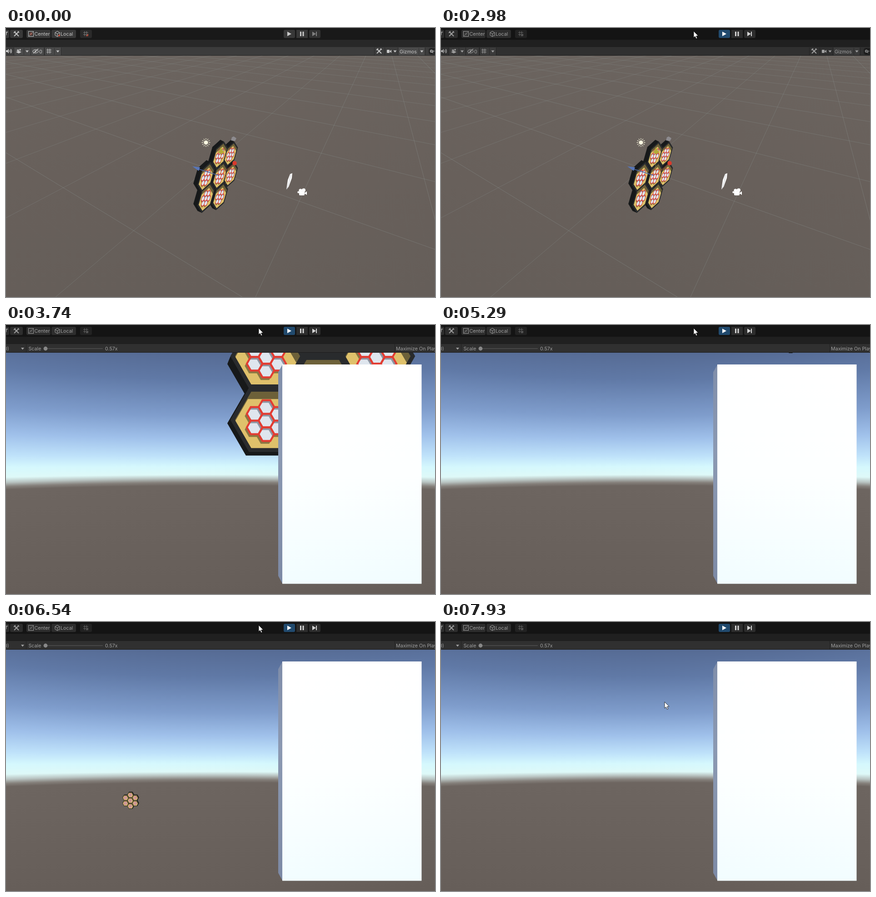
An HTML page with a canvas for the animation above (8000 ms loop, 944 px wide and 593 px high).

```html
<!DOCTYPE html>
<html lang="en">
<head>
<meta charset="utf-8">
<title>Hive editor</title>
<style>
html, body { margin: 0; width: 100%; height: 100%; overflow: hidden; background: #191919; }
canvas { display: block; }
</style>
</head>
<body>
<canvas id="stage" width="944" height="593"></canvas>
<script>
const W = 944, H = 593, LOOP = 8000, TOP = 61;
const PLAY = 1180, GAME = 3040;
const ctx = document.getElementById('stage').getContext('2d');
const S3 = Math.sqrt(3);
const FLOWER = [[0, -1], [1, -1], [-1, 0], [0, 0], [1, 0], [-1, 1], [0, 1]];

function layer(paint) {
  const c = document.createElement('canvas');
  c.width = W;
  c.height = H;
  paint(c.getContext('2d'));
  return c;
}

function poly(g, pts, fill) {
  g.beginPath();
  for (let i = 0; i < pts.length; i += 2) g.lineTo(pts[i], pts[i + 1]);
  g.closePath();
  g.fillStyle = fill;
  g.fill();
}

function disc(g, x, y, r, fill) {
  g.beginPath();
  g.arc(x, y, r, 0, 7);
  g.fillStyle = fill;
  g.fill();
}

function rect(g, x, y, w, h, fill, r = 0) {
  g.beginPath();
  g.roundRect(x, y, w, h, r);
  g.fillStyle = fill;
  g.fill();
}

function line(g, pts, color, width = 1) {
  g.beginPath();
  for (let i = 0; i < pts.length; i += 2) g.lineTo(pts[i], pts[i + 1]);
  g.strokeStyle = color;
  g.lineWidth = width;
  g.stroke();
}

// Position at time t on a list of [time, ...values]
function track(t, keys) {
  let i = 1;
  while (i < keys.length - 1 && keys[i][0] < t) i++;
  const a = keys[i - 1], b = keys[i];
  const k = Math.min(1, Math.max(0, (t - a[0]) / (b[0] - a[0])));
  return a.slice(1).map((v, n) => v + (b[n + 1] - v) * k);
}

// ---- hive ----

function hexPath(g, x, y, r) {
  g.beginPath();
  for (let k = 0; k < 6; k++) {
    g.lineTo(x + r * Math.cos(k * Math.PI / 3), y + r * Math.sin(k * Math.PI / 3));
  }
  g.closePath();
}

function hex(g, x, y, r, fill) {
  hexPath(g, x, y, r);
  g.fillStyle = fill;
  g.fill();
}

// Hexagon whose upper right inside lies in shadow
function pit(g, x, y, r, dx, dy, dark, light) {
  g.save();
  hex(g, x, y, r, dark);
  g.clip();
  hex(g, x + dx, y + dy, r, light);
  g.restore();
}

function miniCells(paint) {
  const r = 0.213;
  for (const [q, s] of FLOWER) paint(-0.03 + 1.5 * r * q, 0.02 + S3 * r * (s + q / 2), r);
}

// One cell in unit size, in the current transform
function cell(g, inner) {
  hex(g, 0, 0, 1.01, '#292b2d');
  pit(g, 0, 0, inner, -0.09, 0.2, '#6d6139', '#dfc16b');
  miniCells((x, y, r) => hex(g, x - 0.04, y + 0.06, r * 1.08, '#8a7743'));
  miniCells((x, y, r) => pit(g, x, y, r, -0.045, 0.07, '#8d95a2', '#dfe6ee'));
  g.strokeStyle = '#e23d33';
  g.lineWidth = 0.052;
  miniCells((x, y, r) => { hexPath(g, x, y, r); g.stroke(); });
}

// cells: {m: affine matrix, off: shift of the back face}
function drawHive(g, cells, inner) {
  for (const { m, off } of cells) {
    for (let k = 6; k > 0; k--) {
      g.save();
      g.translate(off[0] * k / 6, off[1] * k / 6);
      g.transform(...m);
      hex(g, 0, 0, 1.01, '#17191a');
      g.restore();
    }
  }
  for (const { m } of cells) {
    g.save();
    g.transform(...m);
    cell(g, inner);
    g.restore();
  }
}

function gameHive(g, cx, cy, r) {
  const depth = 0.065 * r / 81;
  drawHive(g, FLOWER.map(([q, s]) => {
    const x = cx + 1.5 * r * q, y = cy + S3 * r * (s + q / 2);
    return { m: [r, 0, 0, r, x, y], off: [(472 - x) * depth, (327 - y) * depth] };
  }), 0.885);
}

function sceneHive(g) {
  drawHive(g, FLOWER.map(([q, s]) => {
    const k = q < 0 ? 1.1 : q > 0 ? 0.9 : 1;
    const x = 471 + 27 * q - 3.5 * q * q;
    const y = 326 - 25.5 * q + 45 * (s + q / 2);
    return { m: [17.5 * k, -16 * k, 0, 26 * k, x, y], off: [-8 * k, -4] };
  }), 0.86);
}

// ---- scene view ----

function paintScene(g) {
  const bg = g.createLinearGradient(0, TOP, 0, H);
  bg.addColorStop(0, '#6b645f');
  bg.addColorStop(0.5, '#68605b');
  bg.addColorStop(1, '#655e59');
  rect(g, 0, TOP, W, H - TOP, bg);

  // Two families of parallels, each meeting in a point on the horizon
  const family = (vx, first, step, count, alpha) => {
    for (let n = 0; n < count; n++) {
      line(g, [first + step * n, H, vx, -18], `rgba(142,152,150,${alpha / (1 + n * 0.07)})`);
    }
  };
  family(-479, 520, 719, 22, 0.38);
  family(828, 1429, -440, 26, 0.38);
  family(-479, 520 - 719, 71.9, 34, 0.045);
  family(828, 1429, -44, 60, 0.045);

  sceneHive(g);

  // Move handles
  poly(g, [495, 248, 497, 241, 501, 239, 507, 243, 504, 249], 'rgba(150,150,156,.8)');
  line(g, [424, 311, 468, 325], '#4c68a6', 1.5);
  poly(g, [410, 305, 427, 307, 424, 315], '#5876b8');
  poly(g, [467, 275, 473, 263, 480, 274, 474, 278], '#b3ab38');
  line(g, [473, 278, 472, 322], 'rgba(179,171,56,.5)');
  line(g, [472, 324, 500, 300], 'rgba(214,62,44,.7)');
  disc(g, 503, 298, 4.8, '#d83a2d');
  g.setLineDash([2, 3]);
  line(g, [462, 322, 483, 318, 484, 345], '#d07c2c');
  g.setLineDash([]);

  // Light
  for (let k = 0; k < 12; k++) {
    const a = k * Math.PI / 6, c = Math.cos(a), s = Math.sin(a);
    line(g, [440 + 6 * c, 252.5 + 6 * s, 440 + 9.5 * c, 252.5 + 9.5 * s], '#f4f0d8', 1.2);
  }
  disc(g, 440, 252.5, 4.6, '#fffbe2');

  // Slab seen from the side and the camera
  poly(g, [617, 356, 620, 335, 625, 322, 630, 320, 629, 331, 622, 350], '#fafafa');
  line(g, [618, 355, 624, 337, 626, 323], '#b9bcc2', 0.8);
  disc(g, 648, 358, 3.6, '#fff');
  disc(g, 655, 357.5, 4, '#fff');
  rect(g, 645, 360, 12, 9, '#fff', 2);
  poly(g, [656, 364, 662, 360, 662, 368], '#fff');
  disc(g, 643.5, 362, 2.2, '#fff');
}

// ---- game view ----

function paintSky(g) {
  const stops = [
    [61, '#566b94', -1], [120, '#6079a6', -1], [200, '#7f9dcc', -0.7], [250, '#9fc0ea', -0.4],
    [290, '#bfe2fa', -0.1], [312, '#d5f8fd', 0.2], [330, '#def9f8', 0.6],
    [338, '#b9c4c2', 1], [347, '#85807b', 1], [354, '#6d6560', 1], [593, '#665e59', 0]
  ];
  for (let x = 0; x < W; x++) {
    const k = ((x - 472) / 472) ** 2;
    const v = g.createLinearGradient(0, 0, 0, H);
    for (const [y, color, bend] of stops) {
      v.addColorStop((y + k * bend * (bend < 0 ? 24 : 9)) / H, color);
    }
    g.fillStyle = v;
    g.fillRect(x, TOP, 1, H - TOP);
  }
}

function paintSlab(g) {
  const side = g.createLinearGradient(0, 87, 0, 570);
  side.addColorStop(0, '#7f8da9');
  side.addColorStop(0.4, '#8b99b2');
  side.addColorStop(1, '#7c89a5');
  poly(g, [599, 104, 608.5, 87, 608.5, 570.5, 599, 553], side);
  const front = g.createLinearGradient(0, 87, 0, 570);
  front.addColorStop(0, '#fff');
  front.addColorStop(0.5, '#fdffff');
  front.addColorStop(1, '#f2fdff');
  rect(g, 608, 87, 306.5, 483.5, front);
}

// Place and radius of the hive, null while it is out of sight
function hivePose(t) {
  if (t < 3740) return [373, 325, 98];
  if (t < 3810) return [697, 139, 81];
  if (t < 3880) return [900, 10, 68];
  if (t < 5290 || t >= 7110) return null;
  const s = 5290 + Math.floor((t - 5290) / 70) * 70;
  if (s < 5700) {
    return track(s, [[5290, 771, 42, 7.1], [5430, 915, 230, 7.1], [5500, 888, 280, 7.1], [5700, 612, 231, 7.1]]);
  }
  const x = s < 6540 ? 248 + (6540 - s) * 0.431 : 248 - (s - 6540) * 0.47;
  const y = s < 6505
    ? 394 - 164 * Math.pow((6505 - s) / 805, 1.6)
    : 394 - 95 * Math.pow((s - 6505) / 535, 1.6);
  return [x, y, 7.1];
}

// ---- bars ----

function paintBars(g, playing, game, pressed) {
  const gray = v => {
    const n = Math.round(v * (playing ? 0.8 : 1));
    return `rgb(${n},${n},${n})`;
  };
  const ink = gray(200), face = gray(56), red = playing ? gray(120) : '#d2523c';
  const label = (s, x, y) => { g.fillStyle = ink; g.fillText(s, x, y); };
  const arrow = (x, y) => poly(g, [x - 3.5, y - 2, x + 3.5, y - 2, x, y + 2.5], ink);
  const tools = (x, y) => {
    line(g, [x - 5, y - 5, x + 5, y + 5], ink, 2);
    line(g, [x + 5, y - 5, x - 5, y + 5], ink, 2);
    line(g, [x - 6, y - 2, x - 2, y - 6], ink, 1.6);
    line(g, [x + 3, y - 6, x + 6, y - 3], ink, 1.6);
  };
  const mesh = (x, y, color) => {
    for (const d of [-3, 1.5]) {
      line(g, [x - 6, y + d, x + 5, y + d], color);
      line(g, [x + d, y - 6, x + d, y + 5], color);
    }
  };
  g.font = '10.7px Inter, "Open Sans", sans-serif';
  g.textBaseline = 'alphabetic';

  rect(g, 0, 0, W, 26, gray(25));
  rect(g, 0, 26, W, 16, gray(40));
  rect(g, 0, 42, W, 18, gray(60));
  rect(g, 0, 60, W, 1, gray(35));

  rect(g, -4, 4, 11, 18, face, 3);
  line(g, [0, 16, 1, 9, 4, 9], ink, 1.4);
  rect(g, 9, 4, 28, 18, face, 3);
  tools(23, 13);
  rect(g, 45, 4, 53, 18, face, 3);
  g.strokeStyle = ink;
  g.lineWidth = 1;
  g.strokeRect(49.5, 7.5, 11, 11);
  line(g, [51, 17, 59, 9], ink);
  g.beginPath();
  g.arc(55, 13, 2.3, 0, 7);
  g.strokeStyle = red;
  g.stroke();
  label('Center', 62.5, 17);
  rect(g, 100, 4, 54, 18, face, 3);
  line(g, [113, 7, 118, 10, 118, 16, 113, 19, 108, 16, 108, 10, 113, 7], ink);
  line(g, [108, 10, 113, 13, 118, 10], ink);
  line(g, [113, 13, 113, 19], ink);
  disc(g, 117, 16.5, 2, red);
  label('Local', 120, 17);
  rect(g, 163, 4, 26, 18, gray(42), 3);
  mesh(176, 13, gray(125));
  line(g, [176, 17, 180, 17, 180, 13], red, 1.6);

  rect(g, 611, 4, 25, 18, playing ? '#214a6e' : pressed ? '#4a4a4a' : face, 3);
  rect(g, 639, 4, 25, 18, face);
  rect(g, 667, 4, 25, 18, playing ? face : gray(50), 3);
  const bright = playing ? '#d4d4d4' : '#c8c8c8';
  const dim = playing ? bright : '#808080';
  poly(g, [619, 8, 628, 13, 619, 18], playing ? '#fff' : bright);
  rect(g, 647, 8, 3, 10, bright);
  rect(g, 652.5, 8, 3, 10, bright);
  poly(g, [674, 8, 682, 13, 674, 18], dim);
  rect(g, 682, 8, 2, 10, dim);

  if (game) {
    label('0)', -4, 55.5);
    arrow(36.5, 52);
    rect(g, 44, 42, 1, 18, gray(42));
    label('Scale', 49.5, 55.5);
    rect(g, 88, 51.5, 125, 1, gray(118));
    disc(g, 87, 52, 4.4, gray(170));
    label('0.57x', 218, 55.5);
    rect(g, 855, 42, 1, 18, gray(42));
    label('Maximize On Play', 858, 55.5);
    return;
  }

  const light = gray(74);
  for (const [x, w] of [[18, 36], [55, 28], [86, 35], [864, 57]]) rect(g, x, 43, w, 17, light);
  for (const x of [17, 54, 84, 121, 810, 833, 862, 922]) rect(g, x, 43, 1, 17, gray(42));
  poly(g, [0, 49, 3, 49, 6, 46, 6, 56, 3, 53, 0, 53], ink);
  for (const r of [3, 6]) {
    g.beginPath();
    g.arc(6, 51, r, -0.8, 0.8);
    g.strokeStyle = ink;
    g.stroke();
  }
  poly(g, [22, 53, 28, 50, 34, 53, 28, 56], ink);
  poly(g, [23, 49, 27, 47, 29, 49, 26, 51], ink);
  disc(g, 31, 48, 1.8, ink);
  rect(g, 39, 44, 1, 15, gray(50));
  arrow(46.5, 51.5);
  g.beginPath();
  g.ellipse(65, 51.5, 6, 3.6, 0, 0, 7);
  g.strokeStyle = ink;
  g.lineWidth = 1.2;
  g.stroke();
  disc(g, 65, 51.5, 1.8, ink);
  line(g, [60, 56, 71, 46], ink, 1.3);
  label('0', 73, 55.5);
  mesh(95, 51.5, ink);
  rect(g, 106, 44, 1, 15, gray(50));
  arrow(114, 51.5);

  tools(821, 51);
  rect(g, 838, 48, 6, 7, ink, 1);
  poly(g, [844, 51.5, 848, 48, 848, 55], ink);
  arrow(856, 51.5);
  label('Gizmos', 866, 55.5);
  rect(g, 908, 44, 1, 15, gray(50));
  arrow(915, 51.5);
  rect(g, 930, 44, 20, 15, gray(38), 5);
  g.beginPath();
  g.arc(936, 51, 2.2, 0, 7);
  g.strokeStyle = ink;
  g.stroke();
  line(g, [938, 53, 940, 55], ink, 1.2);
  rect(g, 940, 50, 2, 2, ink);
}

function paintCursor(g, t) {
  if (t < 70) return;
  const [x, y] = track(t, [
    [70, 913, 243], [300, 795, 148], [550, 660, 50], [700, 606, 22], [830, 615, 13],
    [2040, 615, 13], [2180, 556, 7], [7510, 556, 7], [7700, 530, 70], [7930, 492, 176]
  ]);
  g.save();
  g.translate(x, y);
  g.scale(1.05, 1.05);
  poly(g, [0, 0, 0, 13.5, 3, 10.8, 5.2, 15.8, 7.4, 14.8, 5.2, 10, 9.4, 9.7], '#fff');
  g.strokeStyle = '#111';
  g.lineWidth = 0.8;
  g.stroke();
  g.restore();
}

const scene = layer(paintScene), sky = layer(paintSky);

function draw(t) {
  const game = t >= GAME;
  if (game) {
    ctx.drawImage(sky, 0, 0);
    const pose = hivePose(t);
    if (pose) gameHive(ctx, ...pose);
    paintSlab(ctx);
  } else {
    ctx.drawImage(scene, 0, 0);
  }
  paintBars(ctx, t >= PLAY, game, t >= 900);
  paintCursor(ctx, t);
}

const start = performance.now();
function tick() {
  draw((performance.now() - start) % LOOP);
  requestAnimationFrame(tick);
}
tick();
</script>
</body>
</html>
```
